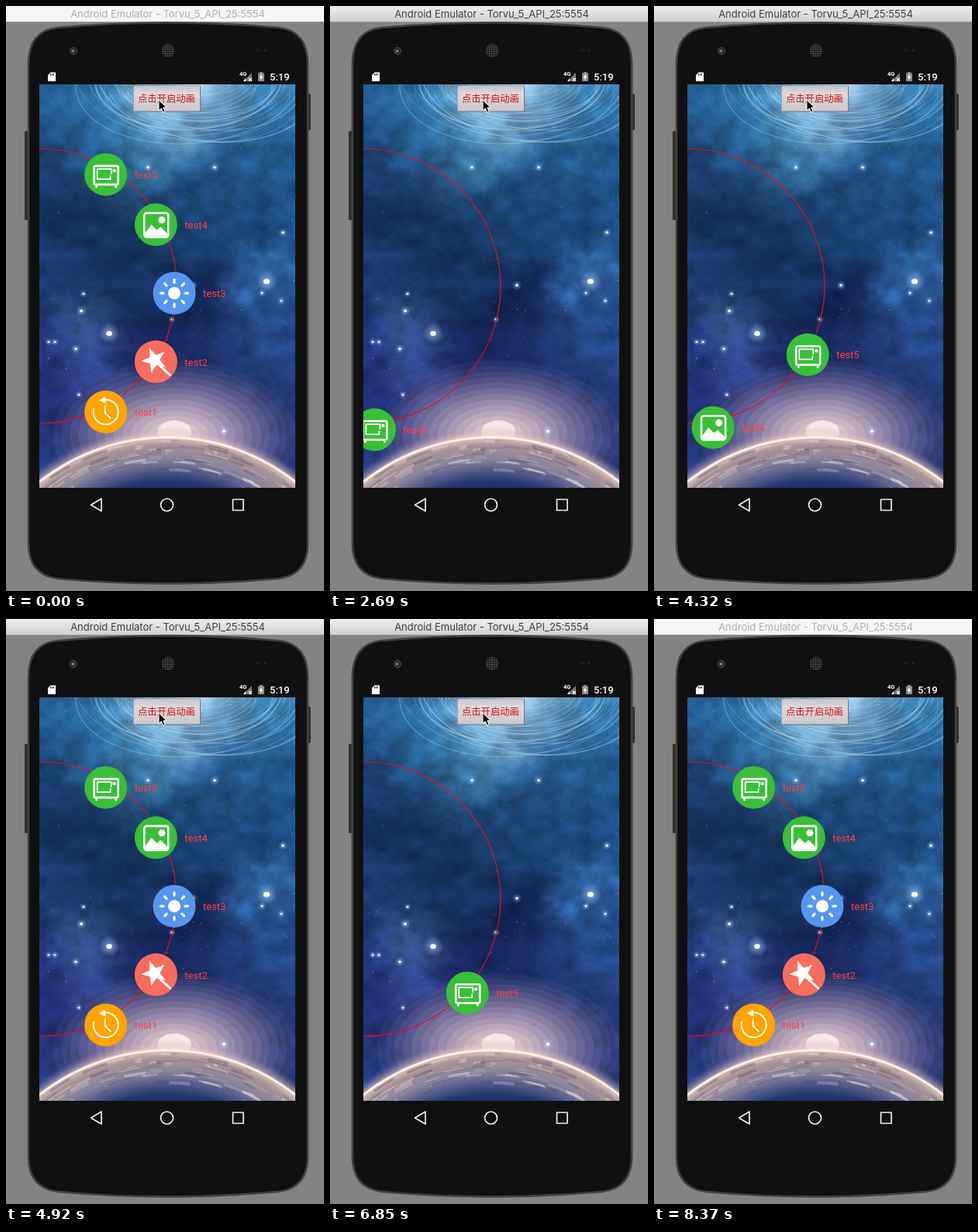
These frames come from a looping animation (410 by 754 pixels, 8.47 s). An HTML page with a canvas:

```html
<!DOCTYPE html>
<html lang="zh">
<head>
<meta charset="utf-8">
<title>Arc menu</title>
<style>
html, body { margin: 0; width: 100%; height: 100%; overflow: hidden; background: #838383; }
#stage { position: relative; width: 410px; height: 754px; overflow: hidden; }
svg, canvas { position: absolute; left: 0; top: 0; display: block; }
#sky { left: 43px; top: 101px; }
text { font-family: Roboto, "Noto Sans", sans-serif; }
#title { font: 13px Inter, Roboto, sans-serif; text-anchor: middle; }
.label { font-size: 13px; fill: #ff4040; }
.icon { fill: none; stroke: #fff; stroke-linejoin: round; stroke-linecap: round; }
.icon .solid { fill: #fff; stroke: none; }
</style>
</head>
<body>
<div id="stage">
<svg width="410" height="754" viewBox="0 0 410 754">
  <defs>
    <linearGradient id="bar" x2="0" y2="1"><stop stop-color="#ededed"/><stop offset="1" stop-color="#d2d1d2"/></linearGradient>
    <pattern id="mesh" width="3" height="3" patternUnits="userSpaceOnUse"><rect width="3" height="3" fill="#1c1c1c"/><circle cx="1.5" cy="1.5" r="1" fill="#555"/></pattern>
  </defs>
  <rect width="410" height="754" fill="#838383"/>
  <rect width="410" height="20" fill="url(#bar)"/>
  <rect id="idle" width="410" height="20" fill="#f6f6f6"/>
  <path d="M0 20.5H410" stroke="#a2a2a2"/>
  <text id="title" x="208.5" y="15">Android Emulator - Torvu_5_API_25:5554</text>
  <g fill="#333"><rect x="24" y="161" width="6" height="115" rx="1.5"/><rect x="388" y="113" width="5" height="47" rx="1.5"/></g>
  <path d="M29 75Q29 32 66 28Q208 15 352 28Q389 32 389 75V693Q389 733 352 738Q208 751 66 738Q29 733 29 693Z" fill="#101010" stroke="#404042" stroke-width="2.6"/>
  <circle cx="87" cy="58" r="4.5" fill="#25282e" stroke="#4b4b4e"/><circle cx="86.5" cy="58" r="1.8" fill="#7a86a0"/>
  <circle cx="209" cy="57.500" r="8.500" fill="url(#mesh)"/>
  <circle cx="325" cy="57" r="1.300" fill="#2a2a2a"/><circle cx="334" cy="57" r="1.300" fill="#2a2a2a"/>
  <path d="M57.500 85.500H64V97H54V89Z" fill="#fff"/>
  <path d="M57.500 87v2.500M59.500 87v2.500M61.500 87v2.500" stroke="#111"/>
  <text x="301" y="90" font-size="7.500" font-weight="700" fill="#fff">4G</text>
  <path d="M317 86V97H306Z" fill="#77797b"/><path d="M309 93V97H306Z" fill="#fff"/>
  <path d="M313 93l4 4m0-4l-4 4" stroke="#fff" stroke-width="1.200"/>
  <path d="M327 85h4v1.500h2V97h-8V86.500h2Z" fill="#8b8c8e"/><path d="M330 87l-3.500 5.500h2L328 96l3.500-5h-2Z" fill="#fff"/>
  <text x="340" y="95.500" font-size="13" font-weight="500" fill="#fff">5:19</text>
  <g fill="none" stroke="#eee" stroke-width="1.700" stroke-linejoin="round">
    <path d="M109.500 643L123 635V651Z"/><circle cx="207.500" cy="643" r="8"/><rect x="292.500" y="636" width="13.500" height="14"/>
  </g>
</svg>
<canvas id="sky" width="330" height="520"></canvas>
<svg width="410" height="754" viewBox="0 0 410 754">
  <defs>
    <clipPath id="screen"><rect x="43" y="101" width="330" height="520"/></clipPath>
    <linearGradient id="key" x2="0" y2="1"><stop stop-color="#c6c3c8"/><stop offset=".3" stop-color="#dcd9dd"/><stop offset="1" stop-color="#cbc7cc"/></linearGradient>
  </defs>
  <g clip-path="url(#screen)">
    <circle cx="43" cy="361" r="177" fill="none" stroke="#e01020" stroke-width="1.200"/>
    <g id="menu"></g>
  </g>
  <rect x="164" y="102.500" width="87" height="34" rx="1.500" fill="#77757c"/>
  <rect id="button" x="164.500" y="103" width="85.500" height="32.500" rx="1" fill="url(#key)"/>
  <rect id="press" x="164.500" y="103" width="85.500" height="32.500" fill="#000" opacity=".12"/>
  <text x="170" y="124" font-size="12.300" fill="#d01212" style="font-family:'Noto Sans CJK SC','Noto Sans CJK',sans-serif">点击开启动画</text>
  <path id="cursor" d="M0 0V13.800L3.200 10.800L5.500 16L8 15L5.800 9.900H10Z" fill="#000" stroke="#fff" stroke-width="1" stroke-linejoin="round"/>
</svg>
</div>
<script>
const $ = id => document.getElementById(id);

// --- wallpaper ---
const W = 330, H = 520;
const ctx = $('sky').getContext('2d');
let seed = 7;
const rnd = () => (seed = seed * 16807 % 2147483647) / 2147483647;

const hash = (x, y) => { const s = Math.sin(x * 127.1 + y * 311.7) * 43758.5453; return s - Math.floor(s); };
const mix = (a, b, k) => a + (b - a) * k;
function noise(x, y) {
  const i = Math.floor(x), j = Math.floor(y);
  let u = x - i, v = y - j;
  u *= u * (3 - 2 * u); v *= v * (3 - 2 * v);
  return mix(mix(hash(i, j), hash(i + 1, j), u), mix(hash(i, j + 1), hash(i + 1, j + 1), u), v);
}
function fbm(x, y) {
  let sum = 0, amp = .5;
  for (let o = 0; o < 4; o++, amp /= 2, x *= 2.1, y *= 2.1) sum += amp * noise(x, y);
  return sum / .9375;
}

// x, y, spread, colour of each cloud
const clouds = [
  [15, 15, 40, 0x245d91], [90, 20, 40, 0x2c74a8], [190, 10, 45, 0x70acd2], [300, 30, 45, 0x2f76ab],
  [30, 85, 35, 0x1f4c80], [140, 105, 30, 0x3a7dab], [220, 105, 35, 0x1c4a7d], [310, 110, 40, 0x1d5288],
  [15, 170, 40, 0x15315d], [90, 185, 45, 0x17355f], [190, 190, 40, 0x1a4274], [270, 170, 35, 0x1a4377],
  [20, 245, 35, 0x1b3a6e], [110, 260, 40, 0x16315f], [285, 255, 30, 0x2f6aa8], [185, 295, 32, 0x101f4b],
  [62, 315, 26, 0x4668a6], [18, 340, 30, 0x22347a], [245, 335, 35, 0x1b2f69], [315, 330, 35, 0x24498a],
  [25, 420, 30, 0x202d76], [62, 385, 24, 0x3a4d98], [130, 370, 35, 0x1c2a68], [270, 400, 40, 0x263878],
  [15, 480, 35, 0x253a7c], [320, 470, 40, 0x2b3d7d]
];

function paintClouds() {
  const img = ctx.createImageData(W, H);
  for (let y = 0, p = 0; y < H; y++) for (let x = 0; x < W; x++, p += 4) {
    const n = fbm(x / 55, y / 45), m = fbm(x / 50 + 20, y / 42 + 9);
    const px = x + (n - .5) * 90, py = y + (m - .5) * 90;
    let r = 0, g = 0, b = 0, sum = 0;
    for (const [cx, cy, s, c] of clouds) {
      const w = Math.exp(-((px - cx) ** 2 + (py - cy) ** 2) / (2 * s * s)) + 1e-5;
      sum += w; r += w * (c >> 16); g += w * (c >> 8 & 255); b += w * (c & 255);
    }
    const k = (.72 + .56 * Math.round(fbm(x / 22 + 5, y / 17) * 14) / 14) / sum;
    img.data[p] = r * k; img.data[p + 1] = g * k; img.data[p + 2] = b * k; img.data[p + 3] = 255;
  }
  ctx.putImageData(img, 0, 0);
}

function disc(x, y, rx, ry, fill) {
  ctx.fillStyle = fill;
  ctx.beginPath(); ctx.ellipse(x, y, rx, ry, 0, 0, 7); ctx.fill();
}
function glow(x, y, r, rgb, a) {
  const g = ctx.createRadialGradient(x, y, 0, x, y, r);
  g.addColorStop(0, `rgba(${rgb},${a})`);
  g.addColorStop(.35, `rgba(${rgb},${a * .4})`);
  g.addColorStop(1, `rgba(${rgb},0)`);
  disc(x, y, r, r, g);
}

function paintSwirl() {
  glow(195, -5, 95, '220,240,252', .75);
  for (let i = 0; i < 26; i++) {
    const s = rnd();
    ctx.strokeStyle = `rgba(190,225,245,${.12 + .3 * rnd()})`;
    ctx.lineWidth = .6 + rnd() * 1.4;
    ctx.beginPath();
    ctx.ellipse(202 + (rnd() - .5) * 36, -6, 55 + s * 95, 20 + s * 64, (rnd() - .5) * .3, 0, 7);
    ctx.stroke();
  }
}

function paintStars() {
  for (let i = 0; i < 75; i++) {
    const r = .3 + rnd() * .5;
    disc(rnd() * W, rnd() * 400, r, r, `rgba(170,205,245,${.3 + rnd() * .5})`);
  }
  [[90, 321, 13], [293, 254, 14], [54, 292, 7], [47, 341, 6], [12, 332, 5], [20, 332, 5], [57, 270, 5], [140, 107, 6],
   [226, 107, 6], [198, 259, 6], [314, 191, 6], [312, 279, 5], [287, 269, 5], [171, 303, 5], [238, 447, 8], [51, 400, 5]]
    .forEach(([x, y, r]) => { glow(x, y, r, '190,215,255', .9); disc(x, y, r * .3, r * .24, '#f4f7ff'); });
}

function paintSunrise() {
  for (let i = 0; i < 12; i++) {
    const k = 1 - i / 12;
    disc(174, 452, 22 + 135 * k, 10 + 86 * k, `rgba(${mix(255, 120, k)},${mix(232, 105, k)},${mix(222, 150, k)},${.13 + .22 * (1 - k)})`);
  }
  disc(174, 448, 22, 15, 'rgba(255,246,240,.75)');
}

function paintPlanet() {
  const x = 165, y = 721, r = 267;
  const halo = ctx.createRadialGradient(x, y, r - 2, x, y, r + 13);
  halo.addColorStop(0, 'rgba(255,238,226,.95)');
  halo.addColorStop(.3, 'rgba(235,200,195,.5)');
  halo.addColorStop(1, 'rgba(160,140,180,0)');
  disc(x, y, r + 13, r + 13, halo);
  const g = ctx.createRadialGradient(x, y, r - 72, x, y, r);
  [[0, '#172d68'], [.2, '#22356f'], [.42, '#59608c'], [.6, '#89829a'], [.85, '#a69497'], [.95, '#cdb6b0'], [1, '#fff4ea']]
    .forEach(s => g.addColorStop(...s));
  disc(x, y, r, r, g);
  ctx.save();
  ctx.beginPath(); ctx.arc(x, y, r - 4, 0, 7); ctx.clip();
  for (let i = 0; i < 120; i++) {
    const a = -Math.PI / 2 + (rnd() - .5) * 1.4, d = r - 4 - rnd() * 44, w = .01 + rnd() * .06;
    ctx.strokeStyle = rnd() < .55 ? `rgba(235,222,220,${.15 + rnd() * .35})` : `rgba(78,70,105,${.15 + rnd() * .25})`;
    ctx.lineWidth = .8 + rnd() * 3;
    ctx.beginPath(); ctx.arc(x, y, d, a - w, a + w); ctx.stroke();
  }
  ctx.restore();
  ctx.strokeStyle = '#fff3e8'; ctx.lineWidth = 2.4;
  ctx.beginPath(); ctx.arc(x, y, r - 1, 0, 7); ctx.stroke();
}

paintClouds();
paintSwirl();
paintSunrise();
paintStars();
paintPlanet();

// --- menu items, leading one first ---
const polar = (r, deg) => { const a = deg * Math.PI / 180; return [r * Math.cos(a), r * Math.sin(a)].map(v => v.toFixed(1)).join(' '); };
const star = Array.from({ length: 10 }, (_, i) => polar(i % 2 ? 7 : 17, -112 + i * 36)).join('L');
const rays = Array.from({ length: 8 }, (_, i) => `M${polar(14, i * 45)}L${polar(17.5, i * 45)}`).join('');

const items = [
  ['#3abf38', `<rect x="-15" y="-11" width="31" height="24" rx="2" stroke-width="2.6"/><path d="M6 2V6H-11V-7H7V-1" stroke-width="1.7"/><circle class="solid" cx="11" cy="-5" r="2.2"/><path d="M-12 14v2M13 14v2" stroke-width="2.6"/>`],
  ['#3abf38', `<rect x="-15" y="-15" width="31" height="31" rx="3" stroke-width="2.6"/><path class="solid" d="M-14 11L-6 0L1 7L6 3L15 12V15H-14Z"/><circle class="solid" cx="7.5" cy="-6" r="4.5"/>`],
  ['#5596ee', `<circle class="solid" r="8"/><path d="${rays}" stroke-width="3.2"/>`],
  ['#f76d5e', `<path class="solid" transform="translate(-2 -2)" d="M${star}Z"/><path d="M4 4L18 17" stroke-width="3"/>`],
  ['#ffa400', `<path d="M${polar(16, -103)}A16 16 0 1 1 ${polar(16, 195)}" stroke-width="2"/><path class="solid" d="M-9 -15L-1 -19.500L0 -11Z"/><path d="M-1 -8V1L6 8" stroke-width="1.900"/>`]
];
$('menu').innerHTML = items.map(([color, icon], i) =>
  `<g><circle r="27.500" fill="${color}"/><g class="icon">${icon}</g><text class="label" x="37" y="5">test${5 - i}</text></g>`).join('');
const nodes = [...$('menu').children];

// --- timing ---
const LOOP = 8470, STEP = 150;
const launches = [2676, 4140, 5428, 6710];
const presses = [4020, 5370, 6700];
const ticks = [
  0, 1350, 2690, 2840, 2990, 3140, 3290, 3430,
  4020, 4170, 4320, 4470, 4620, 4770, 4920,
  5370, 5520, 5670, 5820, 5960, 6110, 6260,
  6700, 6850, 7000, 7150, 7300, 7440, 7590, 7730, 8370
];
const show = (el, on) => el.setAttribute('visibility', on ? 'visible' : 'hidden');
const place = (el, x, y) => el.setAttribute('transform', `translate(${x.toFixed(2)} ${y.toFixed(2)})`);

function draw(now) {
  const t = ticks.filter(v => v <= now).pop();
  const start = launches.filter(v => v <= t).pop() ?? -LOOP;

  nodes.forEach((node, i) => {
    const age = t - start - i * STEP;
    const p = Math.min(1, Math.max(0, age / ((5 - i) * STEP)));
    const a = (90 - 30 * (5 - i) * (1 - (1 - p) ** 2)) * Math.PI / 180;
    show(node, age >= 0);
    place(node, 40.3 + 176.7 * Math.cos(a), 370.2 + 176.7 * Math.sin(a));
  });

  const idle = t < 1350 || t >= 8370;
  show($('idle'), idle);
  $('title').setAttribute('fill', idle ? '#b0aeb0' : '#404040');
  show($('press'), presses.includes(t));

  const k = Math.min(1, Math.max(0, (t - 7150) / 440));
  show($('cursor'), t < 7730);
  place($('cursor'), 197 + 202 * k * k, 121 + 606 * k * k);
}

const begin = performance.now();
function frame() {
  draw((performance.now() - begin) % LOOP);
  requestAnimationFrame(frame);
}
frame();
</script>
</body>
</html>
```
